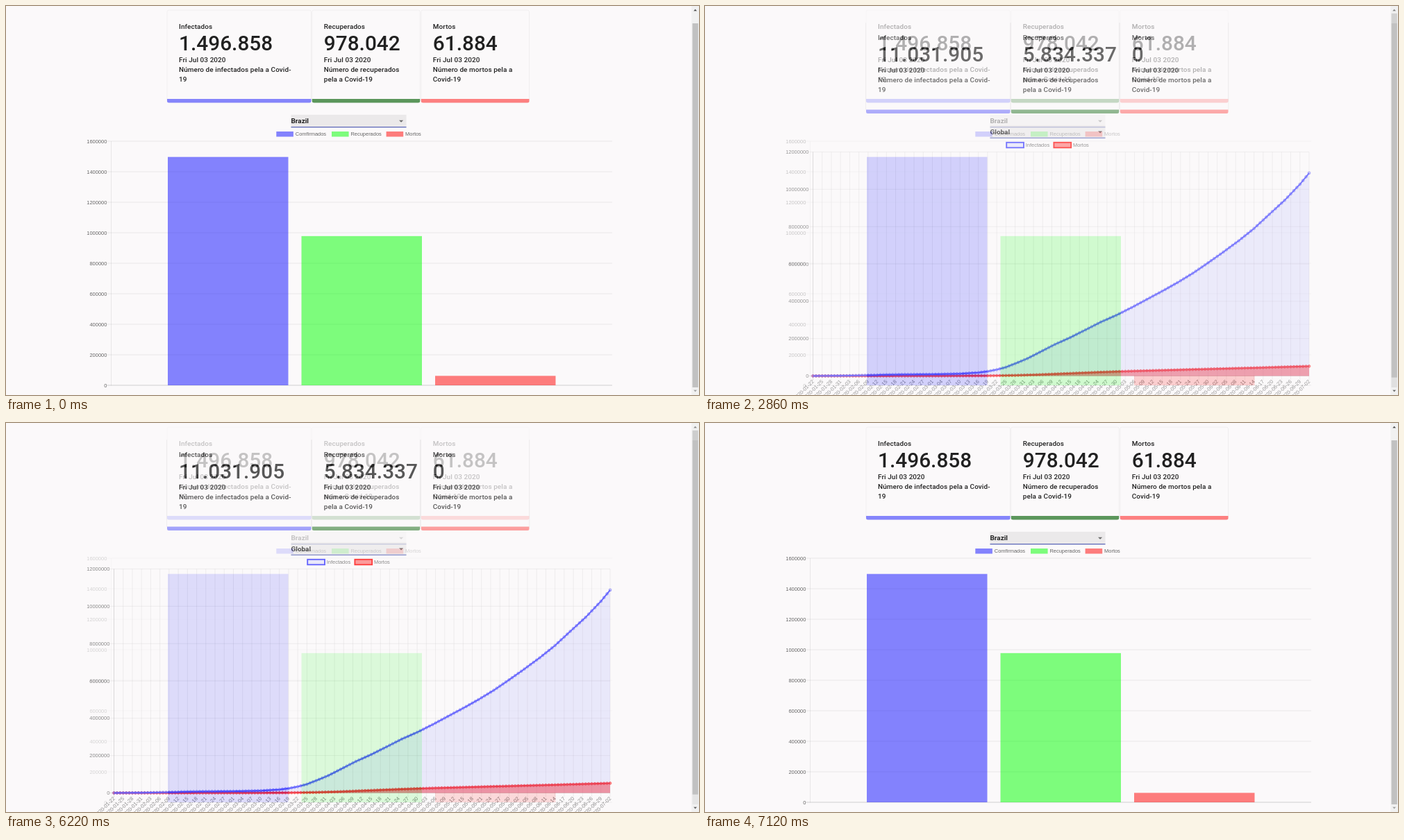
These frames come from a looping animation (998x561 px, 7.14 s). An HTML page:

```html
<!DOCTYPE html>
<html lang="pt">
<head>
<meta charset="utf-8">
<style>
  html, body { margin: 0; width: 100%; height: 100%; overflow: hidden; background: #fbf9fa; }
  svg { display: block; width: 100%; height: 100%; }
  .body { font: 500 9.93px Roboto, sans-serif; letter-spacing: .00938em; fill: #212121; }
  .count { font: 500 29.8px Roboto, sans-serif; fill: #212121; }
  .choice { font: 700 9.93px Roboto, sans-serif; fill: #212121; }
  .label { font: 7.45px "Liberation Sans", Arial, sans-serif; fill: #666; }
</style>
</head>
<body>
<svg viewBox="0 0 998 561">
  <g id="country"></g>
  <g id="world"></g>
</svg>
<script>
const LOOP = 7140;
const STEP = 100;
const FADE = 1000;
const GRID = 'rgba(0,0,0,.1)';
const ZERO = 'rgba(0,0,0,.25)';
const BLUE = 'rgba(0,0,255,.48)', GREEN = 'rgba(0,255,0,.5)', RED = 'rgba(255,0,0,.5)';

const rect = (x, y, w, h, fill, extra = '') =>
  `<rect x="${x}" y="${y}" width="${w}" height="${h}" fill="${fill}" ${extra}/>`;
const line = (x1, y1, x2, y2, stroke = GRID, width = .7) =>
  `<path d="M${x1} ${y1}L${x2} ${y2}" stroke="${stroke}" stroke-width="${width}"/>`;
const text = (kind, x, y, value, extra = '') =>
  `<text class="${kind}" x="${x}" y="${y}" ${extra}>${value}</text>`;
const range = (n, draw) => Array.from({ length: n }, (_, i) => draw(i)).join('');

const cards = [
  { x: 232, w: 207.5, title: 'Infectados', color: '#8585fb', lines: ['Número de infectados pela a Covid-', '19'] },
  { x: 440.8, w: 155.4, title: 'Recuperados', color: '#5b965b', lines: ['Número de recuperados', 'pela a Covid-19'] },
  { x: 597.8, w: 155.7, title: 'Mortos', color: '#fd8080', lines: ['Número de mortos pela a', 'Covid-19'] },
];

function card({ x, w, title, color, lines }, count, boxed) {
  const left = x + 17, right = x + w;
  const edge = boxed
    ? rect(x, 6, w, 133, 'none', 'rx="2.5" stroke="#000" stroke-opacity=".045"')
    : line(x - .5, 8.5, x - .5, 134, '#ebe9ea', 1) + line(right + .3, 8.5, right + .3, 134, '#ebe9ea', 1);
  return edge +
    `<path d="M${x} 134H${right}V137a2.5 2.5 0 0 1-2.5 2.5H${x + 2.5}a2.5 2.5 0 0 1-2.5-2.5Z" fill="${color}"/>` +
    text('body', left, 33.4, title) +
    text('count', left, 64, count) +
    text('body', left, 80.5, 'Fri Jul 03 2020') +
    lines.map((s, i) => text('body', left, 94.7 + 14.1 * i, s)).join('');
}

function header(counts, choice, boxed) {
  return cards.map((c, i) => card(c, counts[i], boxed)).join('') +
    rect(410.5, 156.8, 166, 18.4, '#ebe9ea') +
    rect(410.5, 174.1, 166, 1.2, '#5560b5') +
    text('choice', 410.5, 169.2, choice) +
    '<path d="M566 164.7h6.2l-3.1 3.1Z" fill="#6b6b6b"/>';
}

function scrollbar(thumbTop, upColor, downColor) {
  return rect(987.3, 0, 10.7, 561, '#f1f1f1') +
    rect(988.5, thumbTop, 8.3, 525, '#c1c1c1') +
    `<path d="M990.2 7.2h4.8l-2.4-2.6Z" fill="${upColor}"/>` +
    `<path d="M990.2 553.8h4.8l-2.4 2.6Z" fill="${downColor}"/>`;
}

// Horizontal grid lines with their values, from the top down to zero
function valueAxis(left, right, top, bottom, steps, unit) {
  return range(steps + 1, i => {
    const y = top + (bottom - top) * i / steps;
    return line(left - 6.2, y, right, y, i === steps ? ZERO : GRID) +
      text('label', left - 6.2, y + 2.6, (steps - i) * unit, 'text-anchor="end"');
  });
}

function barChart() {
  const top = 195, bottom = 547;
  const bars = [
    { name: 'Comfirmados', value: 1496858, color: BLUE, key: 389.3 },
    { name: 'Recuperados', value: 978042, color: GREEN, key: 469 },
    { name: 'Mortos', value: 61884, color: RED, key: 547.6 },
  ];
  return valueAxis(151.5, 873, top, bottom, 8, 200000) +
    line(151.5, top, 151.5, bottom + .3) +
    bars.map(({ name, value, color, key }, i) => {
      const h = (bottom - top) * value / 1600000;
      return rect(233 + 192.5 * i, bottom - h, 173.5, h, color) +
        rect(key, 181, 24.6, 7.5, color) + text('label', key + 27.5, 187.2, name);
    }).join('');
}

// [day, thousands of people]
const infected = [[0, .6], [10, 12], [21, 45], [22, 60], [29, 76], [39, 88], [48, 118], [54, 181], [57, 242],
  [60, 337], [63, 467], [66, 660], [70, 932], [74, 1270], [79, 1690], [84, 2060], [89, 2470], [94, 2890],
  [99, 3250], [104, 3660], [109, 4100], [114, 4540], [119, 5000], [124, 5500], [129, 6060], [134, 6640],
  [139, 7240], [144, 7900], [149, 8660], [154, 9410], [159, 10270], [162, 10870]];
const deaths = [[0, 0], [39, 3], [57, 10], [66, 31], [74, 70], [84, 137], [94, 203], [104, 258], [124, 347],
  [144, 433], [162, 521]];

function valueAt(series, day) {
  const i = Math.max(1, series.findIndex(p => p[0] >= day));
  const [d0, v0] = series[i - 1], [d1, v1] = series[i];
  return v0 + (v1 - v0) * (day - d0) / (d1 - d0);
}

function lineChart() {
  const left = 155.5, right = 870, top = 210.5, bottom = 533.5, days = 162;
  const dayX = day => left + (right - left) * day / days;

  const dates = range(days / 3 + 1, i => {
    const x = dayX(i * 3);
    const date = new Date(Date.UTC(2020, 0, 22 + i * 3)).toISOString().slice(0, 10);
    return line(x, top, x, bottom + 6.2, i ? GRID : ZERO) +
      text('label', 0, 2.6, date, `text-anchor="end" transform="translate(${x} ${bottom + 6.7}) rotate(-45)"`);
  });

  const plot = (series, stroke, fill) => {
    const points = Array.from({ length: days + 1 }, (_, day) =>
      [dayX(day).toFixed(2), (bottom - (bottom - top) * valueAt(series, day) / 12000).toFixed(2)]);
    const path = points.map(p => p.join(' ')).join('L');
    return `<path d="M${path}V${bottom}H${left}Z" fill="${fill}"/>` +
      `<path d="M${path}" fill="none" stroke="${stroke}" stroke-width="1.86"/>` +
      points.map(([x, y]) =>
        `<circle cx="${x}" cy="${y}" r="1.86" fill="${fill}" stroke="${stroke}" stroke-width=".62"/>`).join('');
  };

  const key = (x, name, stroke, fill) =>
    rect(x, 196.8, 24.8, 7.5, fill, `stroke="${stroke}" stroke-width="1.86"`) + text('label', x + 27.6, 203, name);

  const blue = ['#3333ff', 'rgba(0,0,255,.09)'], red = ['#ff0000', RED];
  return dates + valueAxis(left, right, top, bottom, 6, 2000000) +
    plot(deaths, ...red) + plot(infected, ...blue) +
    key(434.2, 'Infectados', ...blue) + key(502.4, 'Mortos', ...red);
}

const page = rect(0, 0, 998, 561, '#fbf9fa');
const world = document.getElementById('world');
document.getElementById('country').innerHTML = page +
  header(['1.496.858', '978.042', '61.884'], 'Brazil', true) + barChart() +
  scrollbar(25, '#505050', '#a3a3a3');
world.innerHTML = page +
  `<g transform="translate(0 15.6)">${header(['11.031.905', '5.834.337', '0'], 'Global', false)}</g>` +
  lineChart() + scrollbar(10.7, '#a3a3a3', '#505050');

// cubic-bezier(.25, .1, .25, 1)
function ease(p) {
  if (p >= 1) return 1;
  const bezier = (a, b, s) => 3 * a * s * (1 - s) ** 2 + 3 * b * s * s * (1 - s) + s ** 3;
  let low = 0, high = 1;
  for (let i = 0; i < 24; i++) {
    const mid = (low + high) / 2;
    if (bezier(.25, .25, mid) < p) low = mid; else high = mid;
  }
  return bezier(.1, 1, low);
}

// The fade is seen in steps, the first one already some way in
function fade(t, start, lead) {
  if (t < start) return 0;
  return ease((Math.floor((t - start) / STEP) * STEP + lead) / FADE);
}

function draw(now) {
  const t = now % LOOP;
  world.setAttribute('opacity', fade(t, 2660, 185) - fade(t, 6220, 180));
  requestAnimationFrame(draw);
}
draw(0);
</script>
</body>
</html>
```
